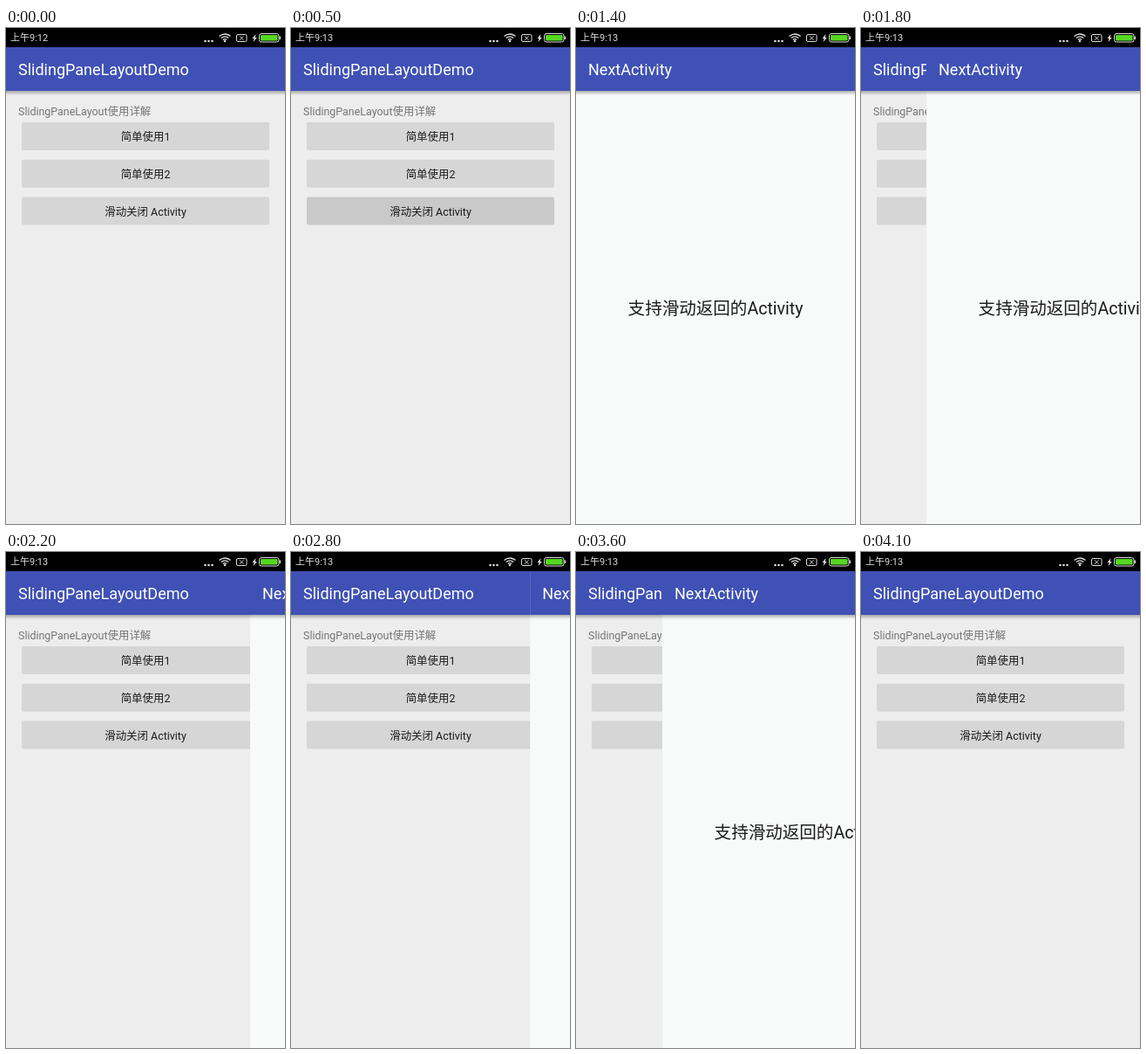
Animation, 320 px wide and 568 px high, one loop 4200 ms. Source, as an HTML page:

```html
<!DOCTYPE html>
<html lang="zh-CN">
<head>
<meta charset="utf-8">
<style>
  html, body { margin: 0; width: 100%; height: 100%; overflow: hidden; background: #000; }
  svg { display: block; width: 320px; height: 568px; }
  text { font-family: Roboto, "Noto Sans CJK SC", "Noto Sans CJK", sans-serif; }
  .title { font-size: 18px; fill: #fff; }
  .label { font-size: 12.44px; fill: #757575; }
  .button rect { fill: #d6d6d6; }
  .button text { font-size: 12.44px; fill: #1c1c1c; text-anchor: middle; }
  .message { font-size: 19.56px; fill: #1c1c1c; text-anchor: middle; }
  .clock { font-size: 11px; fill: #ddd; }
</style>
</head>
<body>
<svg viewBox="0 0 320 568">
  <defs>
    <linearGradient id="shade" x2="0" y2="1">
      <stop stop-opacity=".3"/>
      <stop offset="1" stop-opacity="0"/>
    </linearGradient>
    <g id="bar">
      <rect y="22" width="320" height="50" fill="#3f51b5"/>
      <rect y="72" width="320" height="5" fill="url(#shade)"/>
    </g>
  </defs>

  <rect width="320" height="568" fill="#ededed"/>
  <use href="#bar"/>
  <text class="title" x="14" y="54.3">SlidingPaneLayoutDemo</text>
  <text class="label" x="14" y="99.5">SlidingPaneLayout使用详解</text>
  <g id="buttons"></g>
  <rect id="press" x="18" y="193.5" width="284" height="32" rx="2" opacity="0"/>

  <g id="pane">
    <rect y="22" width="320" height="546" fill="#f8f9f9"/>
    <use href="#bar"/>
    <text class="title" x="14" y="54.3">NextActivity</text>
    <text class="message" x="160" y="328">支持滑动返回的Activity</text>
  </g>

  <rect width="320" height="22" fill="#000"/>
  <text class="clock" id="clock" x="5" y="15.3"></text>
  <g fill="#ddd">
    <circle cx="228.5" cy="15" r="1.3"/>
    <circle cx="232.5" cy="15" r="1.3"/>
    <circle cx="236.5" cy="15" r="1.3"/>
    <circle cx="251" cy="15" r="1.3"/>
    <path d="M286.5 7l-4 5h2l-1 4 4.300-5h-2z"/>
  </g>
  <g fill="none" stroke="#ddd" stroke-width="1.3">
    <path d="M244.500 9.500q6.500-5 13 0M246.700 11.500q4.300-3.400 8.600 0M248.800 13.500q2.200-1.700 4.400 0"/>
    <rect x="264.500" y="7.500" width="11.500" height="8" rx="1.500" stroke-width="1"/>
    <path d="M268 9.300l4.500 4.500m0-4.500l-4.500 4.500" stroke-width="1"/>
    <rect x="290.500" y="6.500" width="22.500" height="9.500" rx="2.500" stroke-width="1"/>
  </g>
  <rect x="292" y="8" width="19.500" height="6.500" rx="1.300" fill="#55d820"/>
  <rect x="313.500" y="9.500" width="1.500" height="3.500" fill="#ddd"/>
</svg>
<script>
const LOOP = 4200, STEP = 100;
const byId = id => document.getElementById(id);

byId("buttons").innerHTML = ["简单使用1", "简单使用2", "滑动关闭 Activity"].map((label, i) => {
  const y = 108 + i * 42.75;
  return `<g class="button"><rect x="18" y="${y}" width="284" height="32" rx="2"/>
    <text x="160" y="${y + 21.3}">${label}</text></g>`;
}).join("");

// Left edge of the pane: [time in ms, x]
const slide = [
  [0, 320], [850, 320], [1000, 180], [1200, 0], [1500, 0], [1800, 75], [2200, 280],
  [2400, 305], [2750, 285], [3100, 209], [3450, 60], [3600, 99], [3900, 320], [LOOP, 320]
];

function paneX(time) {
  const next = slide.findIndex(([t]) => t > time);
  const [t0, x0] = slide[next - 1], [t1, x1] = slide[next];
  return x0 + (x1 - x0) * (time - t0) / (t1 - t0);
}

function draw(now) {
  const time = Math.floor(now % LOOP / STEP) * STEP;
  const touch = Math.min(Math.max((time - 400) / 600, 0), 1);
  byId("clock").textContent = time < 100 ? "上午9:12" : "上午9:13";
  byId("press").setAttribute("opacity", 0.12 * Math.sin(Math.PI * touch));
  byId("pane").setAttribute("transform", `translate(${paneX(time)})`);
}

const start = performance.now();
function tick() {
  draw(performance.now() - start);
  requestAnimationFrame(tick);
}
tick();
</script>
</body>
</html>
```
